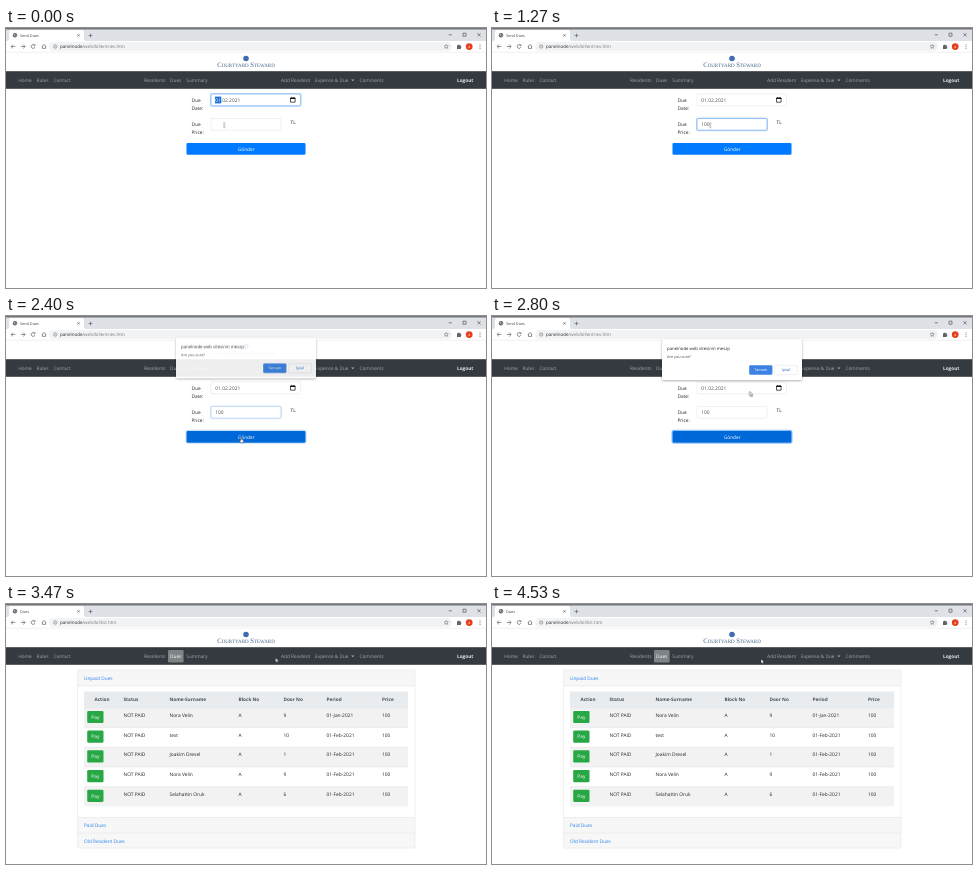
Animation, 480 px wide and 260 px high, one loop 4590 ms. Source, as an HTML page:

```html
<!DOCTYPE html>
<html lang="en">
<head>
<meta charset="utf-8">
<title>Send Dues</title>
<style>
html, body { margin: 0; width: 100%; height: 100%; overflow: hidden; background: #fff; }
svg { display: block; width: 480px; height: 260px; }
text { font: 4.75px "Open Sans", "Noto Sans", sans-serif; fill: #212529; text-rendering: geometricPrecision; }
.mid { text-anchor: middle; }
.bold, .head text { font-weight: 700; }
.icon { fill: none; stroke: #5f6368; stroke-width: .7; }
.tab { font-size: 3.8px; fill: #3c4043; }
.url { font-size: 4.5px; fill: #777b80; }
.host { fill: #2b2d30; }
.logo { font: 6.7px "Liberation Serif", serif; font-variant: small-caps; fill: #3f5f85; }
.nav text { fill: #a4a7aa; }
.nav .logout { fill: #e6e7e8; font-weight: 700; }
.box { fill: #fff; stroke: #d5dae0; stroke-width: .4; }
.ring { fill: none; stroke: #007bff; stroke-opacity: .25; stroke-width: 1.1; }
.edge { fill: none; stroke: #6fb0f8; stroke-width: .6; }
.value { font-size: 4.9px; fill: #495057; }
.row text, .head text { font-size: 4.85px; }
.head text { fill: #495057; font-size: 4.7px; }
.link { fill: #2a83ea; }
.line { fill: none; stroke: #dcdcdc; stroke-width: .4; }
.white { fill: #fff; font-weight: 500; }

.anim { animation: 4590ms linear infinite; }
.cut { animation-timing-function: step-end; }
.form { animation-name: form; }
.list { animation-name: list; }
.picked { animation-name: picked; }
.date { animation-name: date; }
.price { animation-name: price; }
.d1 { animation-name: d1; }
.d2 { animation-name: d2; }
.d3 { animation-name: d3; }
.send { animation-name: send; }
.send-ring { animation-name: send-ring; }
.dialog { animation-name: dialog; }
.globe { animation-name: globe; }
.load { animation-name: load; }
.mouse { animation-name: mouse; }
.beam { animation-name: beam; }
.arrow { animation-name: arrow; }
.hand { animation-name: hand; }

@keyframes form { 0% { opacity: 1 } 74% { opacity: 0 } }
@keyframes list { 0% { opacity: 0 } 74% { opacity: 1 } }
@keyframes picked { 0% { opacity: 1 } 1.4% { opacity: 0 } }
@keyframes date { 0%, 1.4% { opacity: 1 } 4.8%, 100% { opacity: 0 } }
@keyframes price { 0%, 1.4% { opacity: 0 } 4.8%, 50.6% { opacity: 1 } 53.9%, 100% { opacity: 0 } }
@keyframes d1 { 0% { opacity: 0 } 20.2% { opacity: 1 } }
@keyframes d2 { 0% { opacity: 0 } 23.2% { opacity: 1 } }
@keyframes d3 { 0% { opacity: 0 } 27.5% { opacity: 1 } }
@keyframes send { 0%, 43.6% { fill: #007bff } 46.8%, 100% { fill: #0069d9 } }
@keyframes send-ring { 0%, 50.6% { opacity: 0 } 53.9%, 100% { opacity: 1 } }
@keyframes dialog {
  0% { opacity: 0; transform: translateY(-5px) }
  50.7% { opacity: .45; transform: translateY(-4px) }
  52.2% { opacity: .92; transform: translateY(-1.8px) }
  53.7% { opacity: 1; transform: none }
  72.5% { opacity: .3; transform: none }
  74% { opacity: 0; transform: none }
}
@keyframes globe { 0% { opacity: 1 } 72.5% { opacity: 0 } 75.4% { opacity: 1 } }
@keyframes load { 0% { opacity: 0 } 72.5% { opacity: 1 } 75.4% { opacity: 0 } }
@keyframes mouse {
  0%, 39.1% { transform: translate(218.3px, 97.3px) }
  43.5% { transform: translate(229.6px, 118px) }
  49.3%, 55% { transform: translate(235px, 121.5px); animation-timing-function: ease-in-out }
  65%, 73.9% { transform: translate(268.6px, 53px) }
  74%, 91.4% { transform: translate(269.5px, 53.8px) }
  92.9%, 100% { transform: translate(269px, 55px) }
}
@keyframes beam { 0% { opacity: 1 } 40.6% { opacity: 0 } }
@keyframes arrow { 0% { opacity: 0 } 40.6% { opacity: 1 } 42.8% { opacity: 0 } 56.5% { opacity: 1 } }
@keyframes hand { 0% { opacity: 0 } 42.8% { opacity: 1 } 56.5% { opacity: 0 } }
</style>
</head>
<body>
<svg viewBox="0 0 480 260">
  <defs>
    <filter id="shade" x="-10%" y="-10%" width="120%" height="140%">
      <feDropShadow dx="0" dy=".8" stdDeviation="1" flood-opacity=".35"/>
    </filter>
  </defs>

  <!-- browser -->
  <rect width="480" height="13" fill="#dee1e6"/>
  <rect width="480" height="1.5" fill="#77787b"/>
  <path d="M1 13q2 0 2-2V4q0-2 2-2H76q2 0 2 2v7q0 2 2 2z" fill="#fff"/>
  <g class="anim cut globe">
    <circle cx="9" cy="7.3" r="2.2" fill="#5f6368"/>
    <path d="M7.6 6.3l1.4.4-.5 1.2M9.8 8.6l.6-1.4" fill="none" stroke="#fff" stroke-width=".5"/>
  </g>
  <path class="anim cut load" d="M9 5.2a2.1 2.1 0 1 1-2.1 2.1" fill="none" stroke="#5f7fb0" stroke-width=".7"/>
  <path class="icon" d="M71.3 6.2l2.4 2.4m0-2.4l-2.4 2.4M82.6 7.5h3.8m-1.9-1.9v3.8"/>
  <path class="icon" style="stroke:#222;stroke-width:.5" d="M442.7 6.8h3.2M457 5.2h3v3h-3zM471.4 5.2l3.2 3.2m0-3.2l-3.2 3.2"/>
  <rect x="43" y="14" width="403" height="9" rx="4.5" fill="#f1f3f4"/>
  <path class="icon" d="M9.2 18.5H5.2m1.8-1.9l-1.9 1.9 1.9 1.9M15 18.5h4m-1.8-1.9l1.9 1.9-1.9 1.9M28.6 17.3a1.9 1.9 0 1 0 .3 1.8M29 16.2v1.5h-1.5M35.7 18.6l2.3-2 2.3 2m-3.8-.4v2.2h3v-2.2"/>
  <circle class="icon" cx="49.2" cy="18.5" r="1.7" style="stroke-width:.5"/>
  <path class="icon" style="stroke-width:.5" d="M49.2 18.3v1.2m0-2v.4M440.3 16.4l.6 1.4 1.5.1-1.1 1 .3 1.5-1.3-.8-1.3.8.3-1.5-1.1-1 1.5-.1z"/>
  <path d="M451 17.2h1.2a.7.7 0 0 1 1.4 0h1.2v1.2a.7.7 0 0 1 0 1.4V21H451z" fill="#5f6368"/>
  <circle cx="463.2" cy="18.6" r="3.4" fill="#e8401f"/>
  <text class="mid white" x="463.2" y="19.9" style="font-size:3.6px">a</text>
  <path d="M474 16.4v4.8" stroke="#5f6368" stroke-width=".9" stroke-dasharray=".9 1"/>
  <path d="M0 24.3H480" class="line"/>

  <!-- header -->
  <circle cx="240" cy="30.5" r="2.8" fill="#3f6fae"/>
  <text class="logo mid" x="240" y="39.2">Courtyard Steward</text>
  <rect y="43.2" width="480" height="17.6" fill="#343a40"/>
  <g class="nav">
    <text x="12.3" y="54">Home</text>
    <text x="30.5" y="54">Rules</text>
    <text x="47.5" y="54">Contact</text>
    <text x="138" y="54">Residents</text>
    <text x="164" y="54">Dues</text>
    <text x="180.3" y="54">Summary</text>
    <text x="275" y="54">Add Resident</text>
    <text x="309" y="54">Expense &amp; Due</text>
    <path d="M345.2 51.6h3.2l-1.6 1.6z" fill="#a4a7aa"/>
    <text x="353.5" y="54">Comments</text>
    <text class="logout" x="451" y="54">Logout</text>
  </g>

  <!-- due form -->
  <g class="anim cut form">
    <text class="tab" x="14" y="8.7">Send Dues</text>
    <text class="url" x="54" y="20.1"><tspan class="host">panelnode</tspan>/web/billentries.htm</text>
    <text x="185.5" y="73.8">Due</text>
    <text x="185.5" y="81.5">Date:</text>
    <text x="185.5" y="98.3">Due</text>
    <text x="185.5" y="105.9">Price:</text>
    <text x="284.5" y="96.2">TL</text>

    <rect class="box" x="205" y="66" width="89.6" height="11.8" rx="1.3"/>
    <g class="anim date">
      <rect class="ring" x="204.5" y="65.5" width="90.6" height="12.8" rx="1.8"/>
      <rect class="edge" x="205" y="66" width="89.6" height="11.8" rx="1.3"/>
    </g>
    <text class="value" x="209.3" y="73.8">01.02.2021</text>
    <g class="anim cut picked">
      <rect x="209" y="68.6" width="6.2" height="6.8" fill="#1a6fd8"/>
      <text class="value white" x="209.3" y="73.8">01</text>
    </g>
    <path d="M284.5 69.9h4.6v4.3h-4.6zM285.6 69v1m2.4-1v1" fill="none" stroke="#111" stroke-width=".7"/>
    <path d="M284.3 70.5h5" stroke="#111"/>

    <rect class="box" x="205" y="90.5" width="70" height="11.7" rx="1.3"/>
    <g class="anim price">
      <rect class="ring" x="204.5" y="90" width="71" height="12.7" rx="1.8"/>
      <rect class="edge" x="205" y="90.5" width="70" height="11.7" rx="1.3"/>
    </g>
    <text class="value anim cut d1" x="209.2" y="98.4">1</text>
    <text class="value anim cut d2" x="212" y="98.4">0</text>
    <text class="value anim cut d3" x="214.8" y="98.4">0</text>

    <rect class="ring anim send-ring" style="stroke-opacity:.45" x="180" y="114.4" width="120" height="12.8" rx="1.8"/>
    <rect class="anim send" x="180.5" y="114.9" width="119" height="11.8" rx="1.3"/>
    <text class="mid white" x="240.2" y="122.6">Gönder</text>
  </g>

  <!-- dues list -->
  <g class="anim cut list">
    <text class="tab" x="14" y="8.7">Dues</text>
    <text class="url" x="54" y="20.1"><tspan class="host">panelnode</tspan>/web/billlist.htm</text>
    <rect x="162" y="46" width="15.6" height="12.6" rx="1.3" fill="#808386"/>
    <text class="white" x="164" y="54">Dues</text>

    <rect x="71.5" y="66" width="337.5" height="16" fill="#f7f7f7"/>
    <rect x="71.5" y="213.5" width="337.5" height="30.6" fill="#f7f7f7"/>
    <rect class="line" x="71.5" y="66" width="337.5" height="178.1" rx="1.2"/>
    <path class="line" d="M71.5 82H409M71.5 213.5H409M71.5 229H409"/>
    <text class="link" x="78" y="75.6">Unpaid Dues</text>
    <text class="link" x="78" y="223.2">Paid Dues</text>
    <text class="link" x="78" y="238.6">Old Resident Dues</text>

    <g class="head">
      <rect x="78" y="87.5" width="324" height="16.4" fill="#e9ecef"/>
      <text class="mid" x="96" y="97.4">Action</text>
    </g>
    <g id="rows"></g>
  </g>

  <!-- confirm dialog -->
  <g class="anim cut dialog">
    <rect x="170" y="23.5" width="140" height="40.5" rx="1.3" fill="#fff" filter="url(#shade)"/>
    <text x="175" y="33.6" style="font-size:4.3px">panelnode web sitesinin mesajı</text>
    <text x="175" y="42.3" style="font-size:3.8px;fill:#44474a">Are you sure?</text>
    <rect x="257.2" y="49.2" width="23.2" height="9.6" rx="1.2" fill="#3b82e2"/>
    <text class="mid white bold" x="268.8" y="55.4" style="font-size:3.7px">Tamam</text>
    <rect class="box" x="282.6" y="49.3" width="22.8" height="9.4" rx="1.2"/>
    <text class="mid" x="294" y="55.4" style="font-size:3.8px;font-weight:500;fill:#1a5fc4">İptal</text>
  </g>

  <!-- pointer -->
  <g class="anim mouse">
    <path class="anim cut beam" d="M-.8-2.2H.8M0-2.2V2.2M-.8 2.2H.8" fill="none" stroke="#333" stroke-width=".4"/>
    <path class="anim cut arrow" d="M0 0V4.6L1.1 3.6 1.9 5.3 2.6 5 1.9 3.3H3.3z" fill="#fff" stroke="#111" stroke-width=".4"/>
    <path class="anim cut hand" d="M-.5.4Q0-.3.5.4V2L2.4 2.5Q2.8 2.7 2.7 3.3L2.2 5.3H-.4L-1.8 3.3Q-1.6 2.6-.5 3.2z" fill="#fff" stroke="#111" stroke-width=".4"/>
  </g>
</svg>
<script>
const columns = [117.5, 163.5, 232.5, 277.5, 320.5, 376];
const dues = [
  ["Nora Velin", 9, "Jan"],
  ["test", 10, "Feb"],
  ["Joakim Dresel", 1, "Feb"],
  ["Nora Velin", 9, "Feb"],
  ["Selahattin Oruk", 6, "Feb"]
];
const cells = (values, y) =>
  values.map((v, i) => `<text x="${columns[i]}" y="${y}">${v}</text>`).join("");

const header = `<g class="head">${cells(["Status", "Name-Surname", "Block No", "Door No", "Period", "Price"], 97.4)}</g>`;
const body = dues.map(([name, door, month], i) => {
  const y = 103.9 + i * 19.7;
  return `<g class="row">
    <rect x="78" y="${y}" width="324" height="19.7" fill="${i % 2 ? "#fff" : "#f2f2f2"}"/>
    <path class="line" d="M78 ${y}H402"/>
    <rect x="81.2" y="${y + 3}" width="16.3" height="12.2" rx="1.3" fill="#28a745"/>
    <text class="mid white" x="89.4" y="${y + 10.8}">Pay</text>
    ${cells(["NOT PAID", name, "A", door, `01-${month}-2021`, 100], y + 9)}
  </g>`;
}).join("");
document.getElementById("rows").innerHTML = header + body;
</script>
</body>
</html>
```
